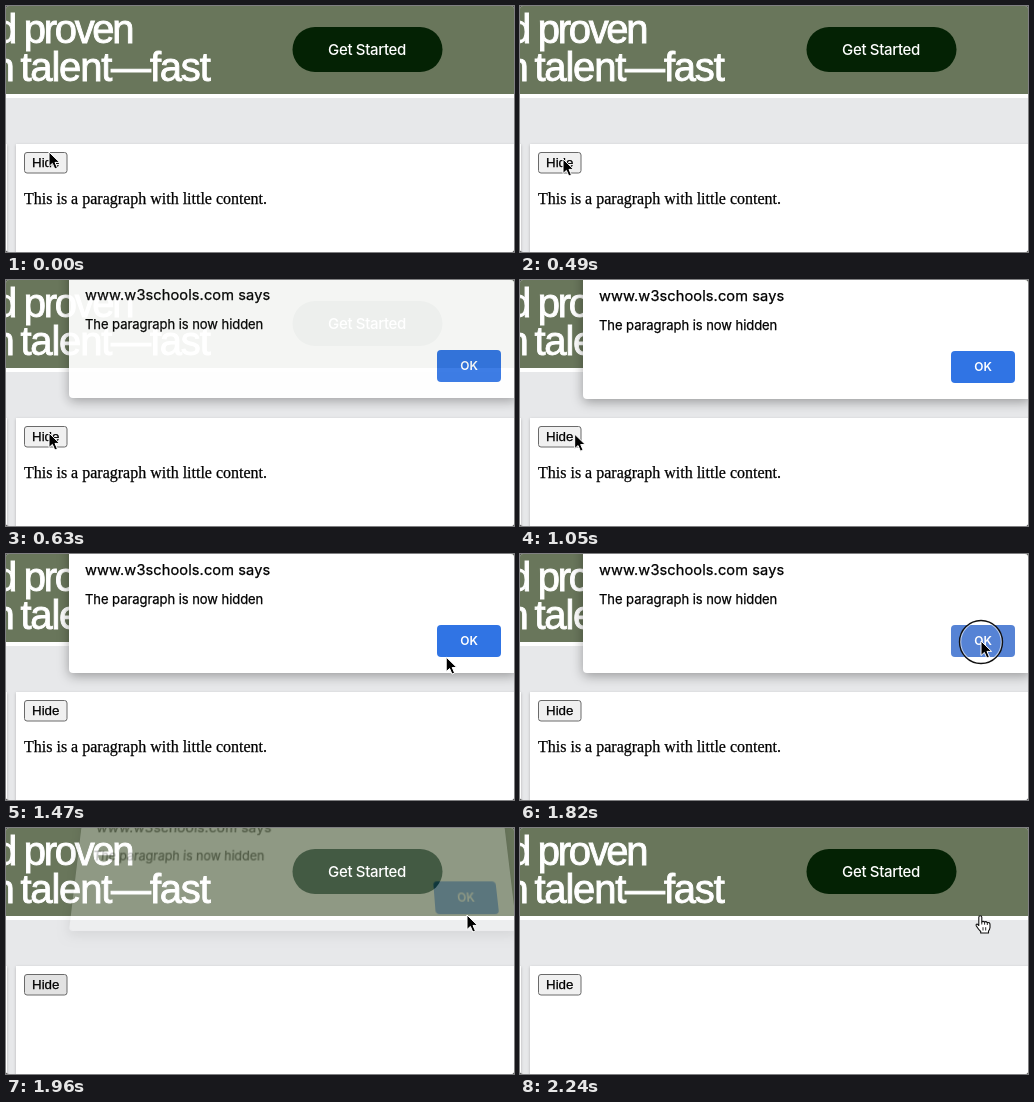
An HTML page for the animation above (2310 ms loop, 508 px wide and 246 px high).

```html
<!DOCTYPE html>
<html lang="en">
<head>
<meta charset="utf-8">
<title>Hide paragraph</title>
<style>
  html, body { margin: 0; width: 100%; height: 100%; overflow: hidden; background: #444; }
  #stage { position: relative; width: 508px; height: 246px; overflow: hidden; border-radius: 3px; background: #e7e8ea; }
  svg { position: absolute; left: 0; top: 0; overflow: visible; }
  .ui { font-family: Inter, sans-serif; }
  .sans { font-family: "Liberation Sans", Arial, sans-serif; }
  .serif { font-family: "Liberation Serif", Times, serif; }
  .headline { font-size: 40px; fill: #fff; stroke: #fff; stroke-width: .9; }
  .dark { fill: #000; stroke: #000; stroke-width: .25; }
  .panel { fill: #fff; filter: drop-shadow(0 1px 1.5px rgba(0, 0, 0, .22)); }
  #dialog {
    position: absolute; left: 63px; top: -20px; width: 448px; height: 139px;
    background: #fff; border-radius: 4px; box-shadow: 0 3px 12px rgba(0, 0, 0, .34);
    transform-origin: 50% 100%;
  }
</style>
</head>
<body>
<div id="stage">
  <svg width="508" height="246">
    <rect width="508" height="88" fill="#69765b"/>
    <rect y="88" width="508" height="4" fill="#fff"/>
    <g class="sans headline">
      <text x="-11" y="37" letter-spacing="-2.3">d proven</text>
      <text x="-13.5" y="75" letter-spacing="-1.2" word-spacing="-3">n talent—fast</text>
    </g>
    <rect x="286.5" y="21" width="150" height="45" rx="22.5" fill="#042204"/>
    <text class="ui" x="361" y="48.5" font-size="15" font-weight="500" letter-spacing="-.35" text-anchor="middle" fill="#fff">Get Started</text>
    <rect class="panel" x="-10" y="138" width="11" height="120"/>
    <rect class="panel" x="10" y="138" width="510" height="120"/>
    <rect id="hide" x="18.5" y="146.5" width="42.5" height="20.5" rx="2.5" stroke="#6a6a6a"/>
    <text class="sans dark" x="26" y="161" font-size="13.33">Hide</text>
    <text id="paragraph" class="serif dark" x="18" y="198" font-size="16">This is a paragraph with little content.</text>
  </svg>

  <div id="dialog">
    <svg class="ui" width="448" height="139" viewBox="63 -20 448 139">
      <g class="dark">
        <text x="79" y="21" font-size="14.6" letter-spacing=".1">www.w3schools.com says</text>
        <text x="79" y="50" font-size="13" letter-spacing="-.05">The paragraph is now hidden</text>
      </g>
      <rect id="ok" x="431" y="71" width="64" height="32" rx="4"/>
      <text x="463" y="91.3" font-size="12" font-weight="600" text-anchor="middle" fill="#fff">OK</text>
    </svg>
  </div>

  <svg width="508" height="246">
    <g id="pointer">
      <g id="ring" fill="none">
        <circle cy="1" r="20.5" stroke="#fff" stroke-width="1.5" stroke-opacity=".6"/>
        <circle cy="1" r="21.5" stroke="#111" stroke-width="1.4"/>
      </g>
      <path id="arrow" d="M0 0V14.5L3.4 11.4L5.8 17L8.4 15.9L6 10.4H10.6Z" fill="#000" stroke="#fff"/>
      <g id="hand" fill="#fff" stroke="#111" stroke-width="1.1" stroke-linejoin="round">
        <path d="M-2.2 10.5V2.2Q-2.2 .8 -.7 .8T.8 2.2V7Q2 5.7 3.6 7Q5 6 6.3 7.6Q8.8 7 9 9.5V12.5Q8.8 14.5 7.5 16V18H-.3V16.5Q-2.5 14.5 -4.8 10.7Q-5.2 8.8 -3.5 9.2Z"/>
        <path d="M.8 7V9.5M3.6 7V9.7M6.3 7.6V10M2 12.2V15.5M4.7 12.2V15.5" stroke-width=".9"/>
      </g>
    </g>
  </svg>
</div>

<script>
const LOOP = 2310, STEP = 70;
const el = id => document.getElementById(id);
const [hide, paragraph, dialog, ok, pointer, ring, arrow, hand] =
  ["hide", "paragraph", "dialog", "ok", "pointer", "ring", "arrow", "hand"].map(el);

const progress = (t, from, to) => Math.min(1, Math.max(0, (t - from) / (to - from)));
const smooth = p => p * p * (3 - 2 * p);
const within = (t, from, to) => t >= from && t < to;
const show = (node, on) => { node.style.visibility = on ? "visible" : "hidden"; };
const bezier = (e, a, b, c, d) =>
  (1 - e) ** 3 * a + 3 * (1 - e) ** 2 * e * b + 3 * (1 - e) * e * e * c + e ** 3 * d;

function pointerAt(t) {
  if (t < 980) return [43, 146 + 7 * smooth(progress(t, 140, 490))];
  const e = smooth(progress(t, 980, 1540));
  return [bezier(e, 43, 130, 300, 461), bezier(e, 153, 160, 220, 87)];
}

function drawDialog(t) {
  const closing = progress(t, 1820, 2030);
  const entering = t < 700;
  show(dialog, within(t, 630, 2030));
  dialog.style.opacity = entering ? .93 : (1 - closing) ** 1.25;
  dialog.style.transform = entering ? "translateY(-1px)" : closing === 0 ? "none" :
    `translateY(${-24 * closing}px) perspective(500px) rotateX(${22.5 * closing}deg) scaleY(${1 + .15 * closing})`;
  const hover = within(t, 1610, 1890) ? progress(t, 1540, 1680) : 0;
  const mix = (a, b) => Math.round(a + (b - a) * hover);
  ok.setAttribute("fill", `rgb(${mix(48, 86)},${mix(116, 131)},${mix(228, 213)})`);
}

function draw(now) {
  const t = Math.floor(now % LOOP / STEP) * STEP;
  const overLink = t >= 2100;
  drawDialog(t);
  show(paragraph, t < 1960);
  hide.setAttribute("fill", within(t, 560, 630) || within(t, 1960, 2100) ? "#e2e2e2" : "#f0f0f0");
  show(ring, within(t, 560, 630) || within(t, 1750, 1890));
  show(arrow, !overLink);
  show(hand, overLink);
  pointer.setAttribute("transform", `translate(${pointerAt(t)})`);
}

const start = performance.now();
(function frame() {
  draw(performance.now() - start);
  requestAnimationFrame(frame);
})();
</script>
</body>
</html>
```
